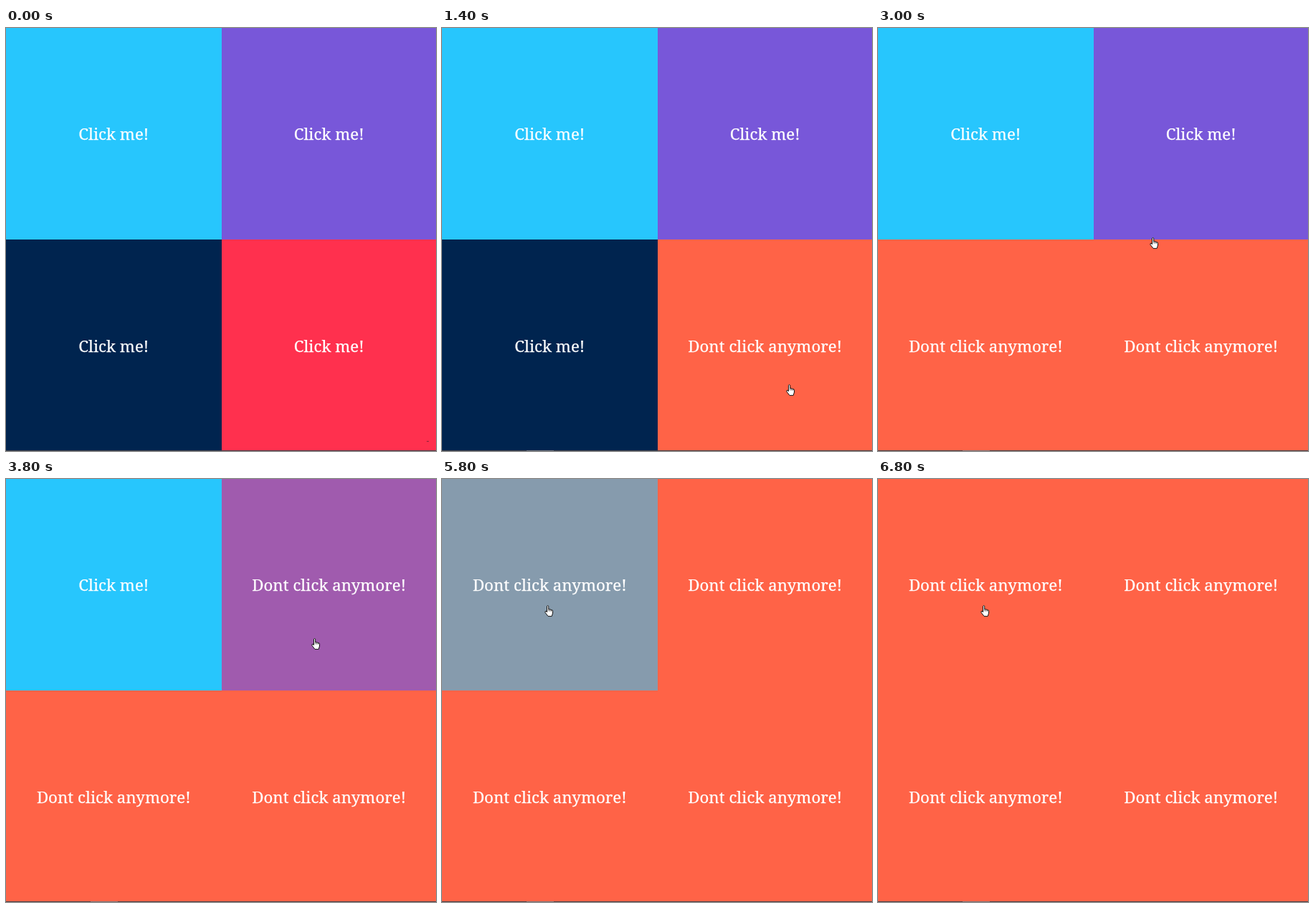
An HTML page for the animation above (7100 ms loop, 600x590 px).

```html
<!DOCTYPE html>
<html lang="en">
<head>
<meta charset="utf-8">
<title>Click me</title>
<style>
  html, body { margin: 0; width: 100%; height: 100%; overflow: hidden; }
  svg { display: block; }
  text {
    font: 22.3px "Noto Serif", serif; text-anchor: middle;
    fill: #fff; stroke: #fff; stroke-width: .25px;
  }
</style>
</head>
<body>
<svg id="stage" width="600" height="590" viewBox="0 0 600 590">
  <g id="tiles"></g>
  <rect y="589" width="600" height="1" fill="#45444a"/>
  <rect id="speck" x="587" y="576" width="3" height="1" fill="#8c2038"/>
  <g id="pointer">
    <rect x="118" y="589" width="38" height="1" fill="#77767a"/>
    <g id="hand" stroke="#111" stroke-linejoin="round" stroke-linecap="round">
      <path fill="#fff" d="M3.5 9.4V1.8Q3.5.6 4.6.6T5.7 1.8V5.6Q7 5 7.6 6.1Q9 5.6 9.6 6.7Q11.5 6.4 11.5 8.2V11L10.2 15.4H5L1 10.2Q.4 8.2 2 8.2Z"/>
      <path fill="none" stroke-width=".7" d="M5.7 5.6V8M7.6 6.1V8.2M9.6 6.7V8.4"/>
    </g>
  </g>
</svg>
<script>
const LOOP = 7100, STEP = 100, FADE = 500;
const CLICKED = [255, 99, 71];
const tiles = [
  { x: 0, y: 0, color: [39, 198, 253], click: 5668 },
  { x: 301, y: 0, color: [120, 87, 217], click: 3700 },
  { x: 0, y: 295, color: [0, 36, 79], click: 2140 },
  { x: 301, y: 295, color: [255, 48, 78], click: 750 }
];
// Pointer stops: time, x, y
const route = [
  [100, 586, 575], [700, 491, 497], [1300, 491, 497],
  [2100, 244, 493], [2400, 244, 493], [3300, 426, 222],
  [3800, 426, 222], [4200, 190, 196], [4400, 190, 196], [4800, 143, 176]
];

const $ = id => document.getElementById(id);
const mix = (a, b, k) => a + (b - a) * k;
const smooth = k => k * k * (3 - 2 * k);

function add(name, attrs) {
  const el = document.createElementNS($("stage").namespaceURI, name);
  for (const key in attrs) el.setAttribute(key, attrs[key]);
  return $("tiles").appendChild(el);
}

// The CSS "ease" curve, cubic-bezier(.25, .1, .25, 1)
function ease(p) {
  if (p <= 0) return 0;
  if (p >= 1) return 1;
  const curve = (u, a, b) => 3 * u * (1 - u) * (1 - u) * a + 3 * u * u * (1 - u) * b + u ** 3;
  let lo = 0, hi = 1;
  for (let i = 0; i < 24; i++) {
    const mid = (lo + hi) / 2;
    if (curve(mid, 0.25, 0.25) < p) lo = mid; else hi = mid;
  }
  return curve(lo, 0.1, 1);
}

function pointer(t) {
  const i = route.findIndex(stop => stop[0] > t);
  if (i < 0) return route[route.length - 1].slice(1);
  const [t0, x0, y0] = route[i - 1], [t1, x1, y1] = route[i];
  const k = smooth((t - t0) / (t1 - t0));
  return [mix(x0, x1, k), mix(y0, y1, k)].map(Math.round);
}

for (const tile of tiles) {
  tile.rect = add("rect", { x: tile.x, y: tile.y, width: 301, height: tile.y ? 294 : 295 });
  tile.label = add("text", { x: tile.x ? 450.7 : 150.3, y: tile.y ? 451.6 : 155.6 });
}

function draw(now) {
  const t = Math.floor(now % LOOP / STEP) * STEP;
  for (const { color, click, rect, label } of tiles) {
    const k = ease((t - click) / FADE);
    rect.setAttribute("fill", `rgb(${color.map((c, i) => Math.round(mix(c, CLICKED[i], k)))})`);
    const words = t >= click - 50 ? "Dont click anymore!" : "Click me!";
    if (label.textContent !== words) label.textContent = words;
  }
  const inside = t >= route[0][0];
  $("pointer").style.display = inside ? "" : "none";
  $("speck").style.display = inside ? "none" : "";
  if (inside) $("hand").setAttribute("transform", `translate(${pointer(t)})`);
}

const start = performance.now();
function tick() {
  draw(performance.now() - start);
  requestAnimationFrame(tick);
}
tick();
</script>
</body>
</html>
```
